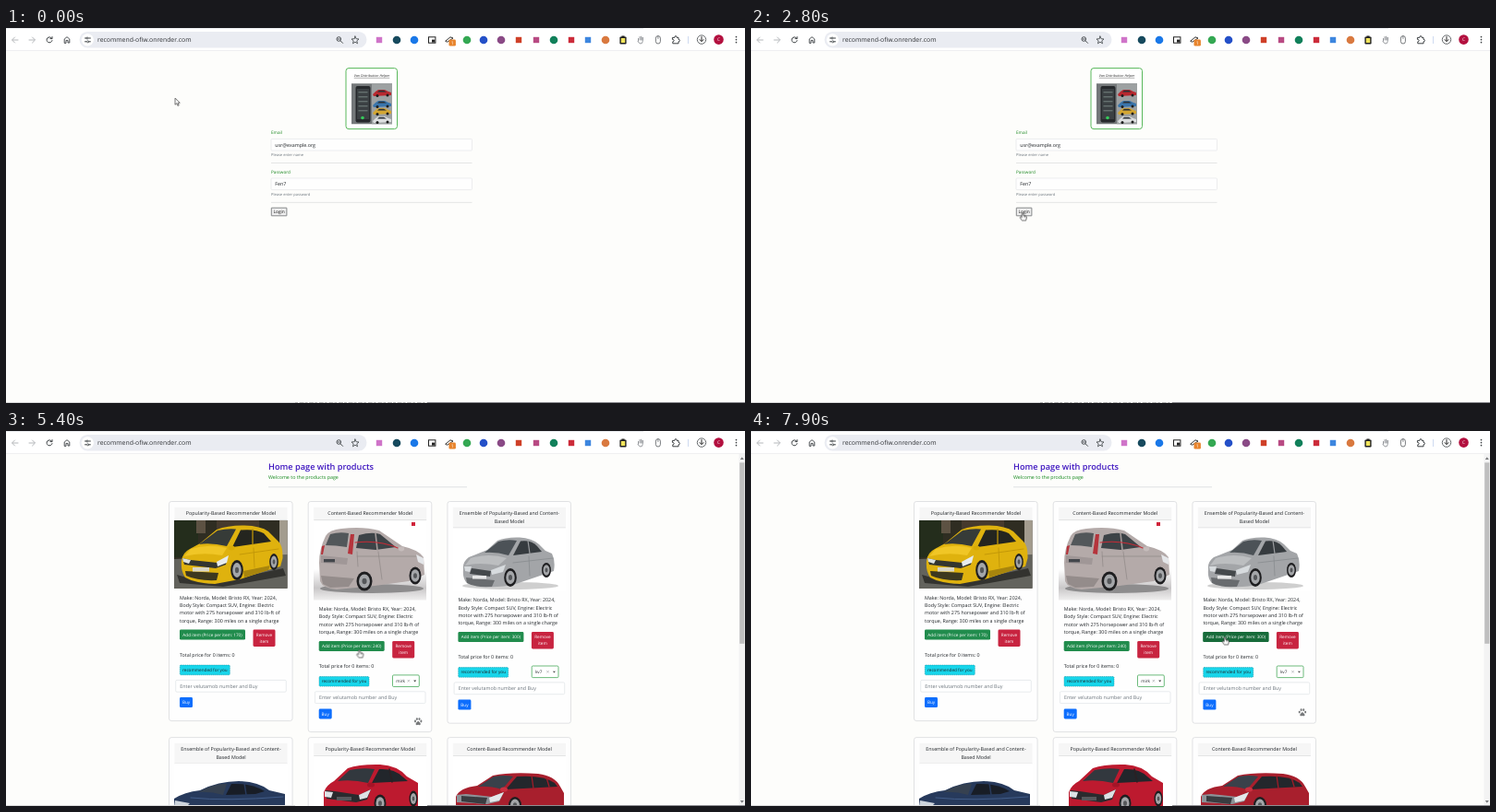
Animation of 800 by 407 pixels, one loop 8 s. Source, as an HTML page:

```html
<!DOCTYPE html>
<html lang="en">
<head>
<meta charset="utf-8">
<title>Recommender demo</title>
<style>
  html, body { margin: 0; width: 100%; height: 100%; overflow: hidden; background: #fdfdfb; }
  svg { display: block; }
  #stage { width: 100%; height: 100%; }
  text { font-family: "Open Sans", "Noto Sans", sans-serif; text-rendering: geometricPrecision; white-space: pre; }
  .line { fill: none; stroke-linecap: round; stroke-linejoin: round; }

  #login, #shop, .paw, .hot, #arrow, #hand { animation: 8s step-end infinite; }
  #login { animation-name: login; }
  #shop { animation-name: shop; }
  #arrow { animation-name: arrow; }
  #hand { animation-name: hand; }
  #paw1 { animation-name: paw1; }
  #paw2 { animation-name: paw2; }
  #paw3 { animation-name: paw3; }
  #hot2 { animation-name: hot2; }
  #hot3 { animation-name: hot3; }
  #cursor { animation: move 8s ease-in-out infinite; }

  @keyframes login { 0% { visibility: visible } 38.75%, 100% { visibility: hidden } }
  @keyframes shop { 0% { visibility: hidden } 38.75%, 100% { visibility: visible } }
  @keyframes paw1 { 0% { opacity: 1 } 44%, 100% { opacity: 0 } }
  @keyframes paw2 { 0% { opacity: 0 } 46% { opacity: 1 } 83.3%, 100% { opacity: 0 } }
  @keyframes paw3 { 0% { opacity: 0 } 85%, 100% { opacity: 1 } }
  @keyframes hot2 { 0% { opacity: 0 } 68% { opacity: 1 } 74%, 100% { opacity: 0 } }
  @keyframes hot3 { 0% { opacity: 0 } 86.5%, 100% { opacity: 1 } }
  @keyframes arrow {
    0% { opacity: 1 } 16.5% { opacity: 0 } 38.75% { opacity: 1 } 66.5% { opacity: 0 }
    74% { opacity: 1 } 86.5%, 100% { opacity: 0 }
  }
  @keyframes hand {
    0% { opacity: 0 } 16.5% { opacity: 1 } 38.75% { opacity: 0 } 66.5% { opacity: 1 }
    74% { opacity: 0 } 86.5%, 100% { opacity: 1 }
  }
  @keyframes move {
    0% { transform: translate(183px, 76px); animation-timing-function: linear }
    12.5% { transform: translate(276px, 181px); animation-timing-function: ease-out }
    18%, 41% { transform: translate(294px, 200.5px) }
    55%, 57% { transform: translate(441.5px, 167px) }
    67.5%, 69% { transform: translate(382.5px, 237.5px) }
    77.5% { transform: translate(418.5px, 226px) }
    90%, 100% { transform: translate(513px, 223.5px) }
  }
</style>
</head>
<body>
<svg id="stage" viewBox="0 0 800 407"></svg>
<script>
const INK = '#212529', BODY = 5.33, SMALL = 4.67;

// y is the visual middle of the line
const text = (x, y, s, size = BODY, fill = INK, more = '') =>
  `<text x="${x}" y="${y + size * .35}" font-size="${size}" fill="${fill}" ${more}>${s}</text>`;
const mid = (x, y, s, size, fill, more = '') => text(x, y, s, size, fill, `text-anchor="middle" ${more}`);
const rect = (x, y, w, h, fill, more = '') =>
  `<rect x="${x}" y="${y}" width="${w}" height="${h}" fill="${fill}" ${more}/>`;
const path = (d, fill, more = '') => `<path d="${d}" fill="${fill}" ${more}/>`;
const line = (d, color, w = 1) => `<path class="line" d="${d}" stroke="${color}" stroke-width="${w}"/>`;
const dot = (x, y, r, fill, more = '') => `<circle cx="${x}" cy="${y}" r="${r}" fill="${fill}" ${more}/>`;
const oval = (x, y, rx, ry, fill) => `<ellipse cx="${x}" cy="${y}" rx="${rx}" ry="${ry}" fill="${fill}"/>`;
const wheel = (x, y, rx, ry) => oval(x, y, rx, ry, '#1e1e20') + oval(x, y, rx * .7, ry * .72, '#a4a6a9') + oval(x, y, rx * .3, ry * .3, '#55575a');
const box = (x, y, w, h, color, fill = '#fff', r = 1, stroke = .7) =>
  rect(x, y, w, h, fill, `rx="${r}" stroke="${color}" stroke-width="${stroke}"`);
const photo = (x, y, w, h, inner) =>
  `<svg x="${x}" y="${y}" width="${w}" height="${h}" viewBox="${x} ${y} ${w} ${h}">${inner}</svg>`;

function toolbar() {
  const dark = '#3c4043', grey = '#b4b7ba';
  const badges = [
    [423, '#174a5e'], [442, '#1a78e8'], [499, '#34a853'], [517, '#2450c8'], [536, '#8a4a86'],
    [593, '#11805a'], [649, '#d9793f']
  ].map(([x, c]) => dot(x, 13, 4.3, c)).join('');
  const squares = [[404, '#cf74c9'], [555, '#cf4028'], [574, '#b84a83'], [612, '#cc2b3a'], [630, '#3d86df']]
    .map(([x, c]) => rect(x - 3.2, 9.8, 6.4, 6.4, c)).join('');
  return rect(0, 0, 800, 24.5, '#fff') + rect(0, 0, 690, .7, '#e1e4e8') + rect(0, 24.2, 800, .6, '#e6e7e9') +
    line('M13 13H7M9.5 10L6.5 13L9.5 16', grey) + line('M25 13H31M28.5 10L31.5 13L28.5 16', grey) +
    line('M49.6 11.2A3 3 0 1 0 50 13.6M50 9.6V11.6H48', dark) +
    line('M63.2 16V12L66 9.7L68.8 12V16H67V13.4H65V16Z', dark, .9) +
    rect(79.5, 4, 311, 17.5, '#eaecf2', 'rx="8.7"') + dot(88.3, 12.8, 6.6, '#fff') +
    line('M85.5 11H87M89.6 11H91.4M85.5 14.8H87M89.6 14.8H91.4', dark) +
    dot(88, 11, 1, 'none', `stroke="${dark}" stroke-width=".8"`) + dot(88.6, 14.8, 1, 'none', `stroke="${dark}" stroke-width=".8"`) +
    text(99, 12.8, 'recommend-ofiw.onrender.com', 6.85, '#303236') +
    dot(360.3, 12, 2.3, 'none', `stroke="${dark}" stroke-width=".9"`) + line('M362 13.8L364.6 16.4M359.3 12H361.3', dark, .9) +
    line('M378 9L379.1 11.7L382 12L379.8 13.9L380.5 16.8L378 15.2L375.5 16.8L376.2 13.9L374 12L376.9 11.7Z', dark, .8) +
    badges + squares +
    rect(457.5, 9.8, 7.4, 6.4, '#fff', 'stroke="#222" stroke-width="1"') + rect(461, 12.6, 3.2, 3, '#222') +
    line('M476 14L481 9.8L484 11L478 15Z', '#333', 1) + rect(479.5, 12.6, 7.4, 7, '#e8842c', 'rx="1.4"') + mid(483.2, 16.2, '1', 5, '#fff') +
    rect(664.4, 9.4, 7.2, 8, '#222', 'rx="1"') + rect(665.8, 11, 4.4, 5, '#f2e45c') + rect(666.4, 8.5, 3.2, 1.8, '#222') +
    line('M684.5 14V11.5M686 13V9.5M687.6 13V9.2M689.2 13V10V14.5Q689 17 687 17Q685.4 17 684 14.4', '#8b8e92', .9) +
    rect(703.4, 8.6, 5, 8.4, 'none', 'rx="2.5" stroke="#55585c" stroke-width=".8"') + line('M705.9 8.8V11.5', '#55585c', .7) +
    line('M721.8 10.4H723.8Q723.8 8.6 725 8.6Q726.2 8.6 726.2 10.4H728V12.4Q729.4 12.4 729.4 13.6Q729.4 14.8 728 14.8V16.8H721.8V14.8Q723.2 14.8 723.2 13.6Q723.2 12.4 721.8 12.4Z', dark) +
    rect(738.2, 9, .8, 8, '#c4d3ee') +
    dot(753, 12.6, 4.7, '#fff', 'stroke="#55585c" stroke-width=".9"') + line('M753 9.6V14.2M751 12.6L753 14.6L755 12.6', '#222') +
    dot(771.5, 12.6, 5.3, '#b3103f') + mid(771.5, 12.6, 'C', 4.8, '#fff') +
    [9.6, 12.6, 15.6].map(y => dot(790.5, y, .85, dark)).join('');
}

function tinyCar(y, c) {
  return path(`M397 ${y + 5}L400 ${y + 2}L403 ${y}H410L414 ${y + 2}L417 ${y + 3}V${y + 6}L398 ${y + 7}Z`, c) +
    path(`M402 ${y + 2.4}L404 ${y + .8}H409L412 ${y + 2.4}Z`, '#2a3036') + dot(402, y + 6.4, 1.5, '#1c1c1c') + dot(413, y + 6, 1.5, '#1c1c1c');
}

function field(label, hint, value, y) {
  return text(287, y, label, SMALL, '#16851c') + box(287, y + 6.8, 217.5, 12.6, '#e4e6e8', '#fefefe') +
    text(291.3, y + 13.4, value) + text(287, y + 24, hint, 4.03, '#6c757d') + rect(287, y + 32.7, 217.5, .6, '#d4d5d6');
}

function login() {
  return box(368, 43.6, 55.5, 66, '#58b85a', '#fff', 3, 1) +
    mid(396, 51.6, 'Van Distribution Helper', 3.75, '#333', 'font-style="italic" text-decoration="underline"') +
    photo(374, 60.3, 44, 44, rect(374, 60, 44, 45, '#74787a') + rect(396, 60, 22, 45, '#9da1a2') +
      tinyCar(67, '#b8282f') + tinyCar(79, '#3975ac') + tinyCar(87, '#d3a632') + tinyCar(96, '#dcdedf') +
      rect(378.5, 63, 16, 39.5, '#26292c', 'rx="2"') + rect(380, 66, 13, 33, '#3b4043') +
      [69, 74, 79, 84, 89].map(y => rect(381.5, y, 10, 1.4, '#65706f')).join('') + dot(386, 97.5, 1.8, '#35c95a')) +
    field('Email', 'Please enter name', 'usr@example.org', 113.6) +
    field('Password', 'Please enter password', 'Fen7', 156.2) +
    box(287.3, 195.2, 16.6, 8.6, '#55585b', '#efefef', .3) + mid(295.6, 199.4, 'Login', 4.85, '#111') +
    line('M313 406.5H456', '#b5b5b5').replace('class="line"', 'stroke-dasharray="3 1.6 5 1"');
}

const yellowCar = photo(182, 97, 122.5, 73.7,
  rect(182, 97, 123, 74, '#2f2d22') + rect(182, 97, 26, 40, '#242d1c') + rect(206, 97, 10, 14, '#5d5243') +
  rect(228, 97, 46, 9, '#463a2d') + rect(296, 97, 9, 44, '#a39c8e') +
  path('M182 139L305 134V171H182Z', '#63635d') + path('M185 156L220 166L300 149L303 157L235 169L188 165Z', '#33332f') +
  path('M190 141Q191 132 199 128L210 122L228 107Q240 102.5 258 102.5Q276 103 284 109L294 119Q300 124 299.5 138L297 147L280 152L253 161L226 166Q204 165 194 159Q189 152 190 141Z', '#dfb20e') +
  path('M209 123L229 108Q240 105.5 249 106.5L239 125Q222 121 209 123Z', '#363b38') +
  path('M245 126L254 107.5Q270 106 279 111L287 120Z', '#24251f') + line('M267 107V123', '#b38c0a', 1.4) +
  path('M200 128Q220 122 239 127L234 135Q212 131 193 136Z', '#f0c626') +
  path('M257 152L286 146L284 151L258 159Z', '#a8850d') +
  path('M191 138L200 140L229 143L240 136L238 145L227 149L193 145Z', '#33352f') +
  path('M191 138L200 140L198 144L192 142Z', '#dde1de') + path('M228 142L241 135L239 143L229 147Z', '#e8eceb') +
  path('M194 152L230 154L228 162Q208 163 195 157Z', '#3d381f') + rect(202, 148, 18, 4.5, '#d9d6c6') +
  oval(244, 127, 3.5, 2.4, '#d8ab06') + line('M253 134L295 128M268 127L269 148', '#b88f06', .7) +
  wheel(250, 151, 6.8, 11) + wheel(290, 142, 4.8, 9));

const greyCar = photo(333, 98, 122, 85.5,
  rect(333, 98, 122, 86, '#fff') + rect(333, 150, 122, 34, 'url(#floor)') +
  rect(439, 99, 4, 4, '#d0243a') + oval(396, 171, 56, 5, '#8d8c8d') +
  path('M339 143Q339 128 346 114Q350 107 363 106Q386 103 404 108L429 125Q447 129 452 137L453 156L436 163L399 168L358 172Q343 171 340 163Z', '#b4aaa9') +
  path('M346 124L351 112Q361 109 371 111L369 126Q357 124 346 124Z', '#52575a') +
  path('M379 127L382 113Q396 109 405 112L422 126L400 129Z', '#3d4347') + line('M400 111L402 129', '#a39a99', 1.6) +
  path('M373 112L377 112L375 134L370 133Z', '#b5343c') + path('M342 125L345 124L343 134L341 134Z', '#b5343c') +
  line('M378 121Q404 118 424 127', '#c62b36', 1.2) + line('M380 136L448 136M403 131L407 161M380 131L381 147', '#8f8786', .7) +
  path('M341 135L370 138L369 145L341 143Z', '#a09797') + rect(344, 139, 12, 3.4, '#44474c') +
  path('M341 157L377 160L371 169L351 170L343 166Z', '#948c8b') + oval(428, 128, 3.2, 2.4, '#c5bcbb') +
  path('M444 134L452 138L452 145L446 142Z', '#e4e6e9') + wheel(388, 163, 8.5, 10.5) + wheel(443, 157, 6.5, 9.5));

const silverCar = photo(484, 106, 122, 68,
  rect(484, 106, 122, 68, '#fff') + oval(546, 168, 52, 4, '#cfcfcf') +
  path('M495 150Q494 142 501 137L521 129L532 119Q541 115 556 115.5Q569 116 577 123L584 130L591 133Q595 141 593 152L552 166Q522 173 499 165Q494 160 495 150Z', '#a3a5a8') +
  path('M518 132L533 120Q543 117 553 119L544 135Q531 131 518 132Z', '#4c5257') +
  path('M549 135L557 119.5Q569 118 575 125L580 131Z', '#363b3f') + line('M565 119L567 133', '#999b9e', 1.2) +
  path('M503 138Q523 132 542 138L533 146Q512 142 497 146Z', '#bcbec0') +
  path('M496 147L504 147L502 153L497 152Z', '#d7dbde') + path('M525 151L541 145L538 153L526 156Z', '#d7dbde') +
  path('M504 149L525 152L524 158L502 155Z', '#45494c') +
  path('M498 159L529 162L526 169Q507 170 499 165Z', '#696c6f') + rect(505, 157, 15, 3.5, '#e8e8e8') +
  line('M549 143L592 138M566 136L567 157', '#85888b', .7) + wheel(546, 159, 6.8, 10) + wheel(585, 151, 5, 8));

const blueCar = rect(182.5, 361, 122, 46, '#fff') +
  path('M182 407V399Q193 392 210 390Q230 380 252 380Q274 381 285 390L302 394V407Z', '#273a5c') +
  path('M208 392Q226 382 239 383L235 395Q221 391 208 392Z', '#364150') +
  path('M238 395L244 383Q265 382 280 391L270 394Z', '#181d26') + line('M258 382L260 395', '#273a5c', 1.5) +
  path('M183 401L199 404L196 407H182Z', '#cdd4dc') + line('M200 398Q238 402 300 397', '#4a6695', .8);

const redHatch = rect(333, 353, 122, 54, '#fff') +
  path('M344 407V392Q347 384 355 380L370 366Q382 361.5 405 362Q424 363 434 375L446 382V407Z', '#bd1a2f') +
  path('M359 380L372 368Q386 365 399 367L392 382Q375 378 359 380Z', '#32383e') +
  path('M396 382L404 367Q420 366 429 375L435 380Z', '#22262b') + line('M415 367L418 381', '#2c2023', 1.5) +
  path('M346 390L356 391L382 395L395 389L391 400L379 403L347 399Z', '#2a2b2e') +
  path('M345 391L354 392L352 398L345 397Z', '#dde2e5') + path('M382 395L395 389L391 398L383 400Z', '#dde2e5') +
  rect(358, 397, 16, 4, '#55585b') + oval(395, 384, 4, 2.6, '#a31427') + wheel(405, 404, 6.5, 9.5) + wheel(441, 399, 4.5, 8.5);

const redVan = rect(484, 353, 122, 54, '#fff') +
  path('M487 407V397Q491 387 510 385L527 374Q546 370 576 372Q594 374 600 386L604 393V407Z', '#a81f2d') +
  path('M511 386L528 375Q540 373 549 375L537 389Q523 385 511 386Z', '#39414a') +
  path('M541 389L553 375Q581 373 594 382L597 386Z', '#23272c') + line('M569 374L571 388M585 376L588 386', '#a01c29', 1.3) +
  path('M488 395L498 394L526 397L539 392L534 402L521 405L488 403Z', '#8c9297') + path('M523 398L539 392L534 401L524 403Z', '#e4e8ea') +
  path('M493 396L521 398L519 405L493 402Z', '#393c40') + oval(539, 389, 4, 2.6, '#ca3040') + wheel(551, 406, 7, 9);

const button = (x, y, w, h, fill) => rect(x, y, w, h, fill, 'rx="1.4"');
const label = (x, y, s) => mid(x, y, s, SMALL, '#fff', 'font-weight="500"');
const paw = (x, y, n) => `<g class="paw" id="paw${n}">` +
  path(`M${x} ${y - .4}q3.4 2.4 2.4 4q-.8 .8 -2.4 0q-1.6 .8 -2.4 0q-1 -1.6 2.4 -4Z`, '#77797b') +
  [[-3.2, -.2], [-1.3, -2.6], [1.3, -2.6], [3.2, -.2]].map(([a, b]) => oval(x + a, y + b, 1, 1.4, '#77797b')).join('') + '</g>';

function frame(x, top, bottom, title) {
  const rows = title.split('|');
  const h = rows.length > 1 ? 21.8 : 13.4;
  return box(x, top, 133.6, bottom - top, '#d4d6d8', '#fefefe', 2.6) +
    rect(x + 6, top + 6.3, 122, h, '#f6f6f6') + rect(x + 6, top + 6.3 + h, 122, .6, '#d4d5d6') +
    rows.map((s, i) => mid(x + 67, top + 12.8 + i * 8.6, s)).join('');
}

// y is the first line of the description
function details(x, y, price, pick, n) {
  const rows = ['Make: Norda, Model: Bristo RX, Year: 2024,', 'Body Style: Compact SUV, Engine: Electric',
    'motor with 275 horsepower and 310 lb-ft of', 'torque, Range: 300 miles on a single charge'];
  const b = y + 34.8;
  return rows.map((s, i) => text(x + 11.5, y + i * 8.4, s)).join('') +
    button(x + 11.5, b, 71, 11, '#218c4d') + (n > 1 ? `<g class="hot" id="hot${n}">${button(x + 11.5, b, 71, 11, '#176b3a')}</g>` : '') +
    label(x + 47, b + 5.4, `Add item (Price per item: ${price})`) +
    button(x + 91, b, 24, 18.4, '#c82440') + label(x + 103, b + 5.3, 'Remove') + label(x + 103, b + 12.6, 'item') +
    text(x + 11.5, y + 62, 'Total price for 0 items: 0') +
    rect(x + 11.8, y + 73.3, 54, 10.6, '#17d5ea', 'rx="1" stroke="#1397a8" stroke-width=".6" stroke-dasharray="1.4 .8"') +
    mid(x + 38.8, y + 78.5, 'recommended for you', SMALL) +
    (pick ? box(x + 91.3, y + 71.7, 28.8, 12.6, '#2f9e44', '#fff', 1.2) + text(x + 95, y + 78, pick, SMALL) +
      line(`M${x + 107.6} ${y + 77}l2 2m0 -2l-2 2`, '#8a8d90', .5) + path(`M${x + 114} ${y + 77.4}h3l-1.5 1.8z`, '#444') : '') +
    box(x + 7.2, y + 89.6, 119.6, 12.8, '#dee2e6', '#fff', 1.3) + text(x + 11.8, y + 96, 'Enter velutamob number and Buy', BODY, '#6c757d') +
    button(x + 11.5, y + 108.3, 14, 11, '#0d6efd') + label(x + 18.5, y + 113.7, 'Buy') +
    paw(x + 119, y + 122, n);
}

function shop() {
  const pop = 'Popularity-Based Recommender Model', content = 'Content-Based Recommender Model';
  const both = 'Ensemble of Popularity-Based and Content-|Based Model';
  const [a, b, c] = [176.5, 327.2, 477.9];
  return text(284, 38.6, 'Home page with products', 9.2, '#3f17c0', 'font-weight="600"') +
    text(284, 50.3, 'Welcome to the products page', BODY, '#168a1e') + rect(284, 60.6, 215, .6, '#c9cdd0') +
    frame(a, 76.5, 314.6, pop) + yellowCar + details(a, 180.8, 170, '', 1) +
    frame(b, 76.5, 326.6, content) + greyCar + details(b, 193.2, 240, 'mirk', 2) +
    frame(c, 76.5, 317.2, both) + silverCar + details(c, 183.3, 300, 'kv7', 3) +
    frame(a, 332.6, 570, both) + blueCar + frame(b, 332.6, 570, pop) + redHatch + frame(c, 332.6, 570, content) + redVan +
    rect(793.4, 25, 6.6, 382, '#f3f3f3') + rect(794.2, 34.3, 5.2, 196.5, '#bfbfbf') +
    path('M794.8 31h4l-2-2.8z', '#77797b') + path('M794.8 401h4l-2 2.8z', '#77797b');
}

const cursor = `<g id="cursor"><g id="arrow">` +
  path('M0 0V7.2L1.7 5.7L2.9 8.3L4.1 7.8L2.9 5.2H5.2Z', '#fff', 'stroke="#222" stroke-width=".65" stroke-linejoin="round"') +
  `</g><g id="hand">` +
  path('M-.8 .6Q0 -.5 .8 .6V3L3.6 3.6Q4.6 4 4.4 5.4L3.6 8.4H-.6L-2.8 5.4Q-2.8 4.2 -1.6 4.6L-.8 5.3Z', '#fff', 'stroke="#222" stroke-width=".65" stroke-linejoin="round"') +
  line('M1.9 3.4V5M3.1 3.6V5', '#222', .4) + '</g></g>';

document.getElementById('stage').innerHTML =
  '<defs><linearGradient id="floor" x2="0" y2="1"><stop stop-color="#fff"/><stop offset=".6" stop-color="#c9c7c8"/><stop offset="1" stop-color="#f1f0f0"/></linearGradient></defs>' +
  rect(0, 0, 800, 407, '#fdfdfb') + `<g id="login">${login()}</g><g id="shop">${shop()}</g>` + toolbar() +
  rect(0, 406, 313, 1, '#dcdcdc') + rect(456, 406, 344, 1, '#8f8f93') + cursor;
</script>
</body>
</html>
```
